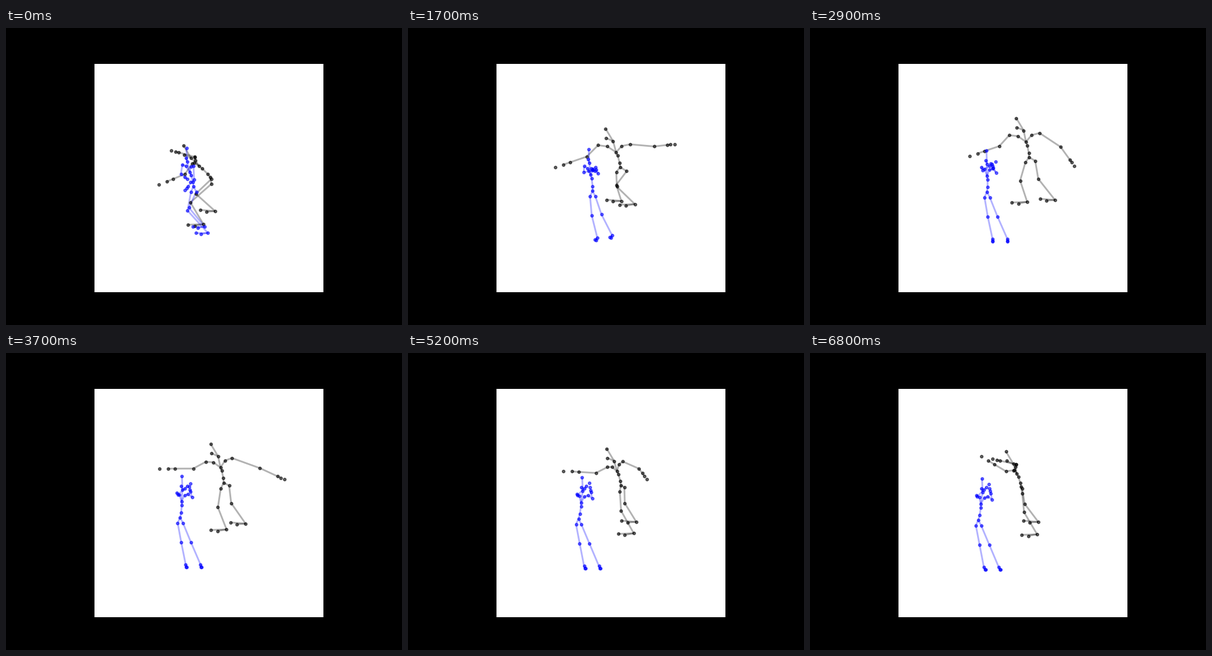
Recreate the animation shown at these times as a matplotlib script. Size 640 px wide and 480 px high, loop 6.9 s.

```python
import numpy as np
import matplotlib.pyplot as plt
from matplotlib.animation import FuncAnimation
from matplotlib.collections import LineCollection

FRAMES, INTERVAL = 69, 100
frames = np.arange(FRAMES)


def vec(x, y):
    """One 2D vector per frame from scalars or per-frame arrays."""
    return np.column_stack([np.broadcast_to(x, FRAMES), np.broadcast_to(y, FRAMES)])


def track(keys):
    """Smooth path through a few keys without overshoot; holds after the last."""
    t, p = np.array(list(keys)), np.array(list(keys.values()), float)
    h = np.diff(t)[:, None]
    d = np.diff(p, axis=0) / h
    m = np.zeros_like(p)
    m[0] = d[0]
    a, b = d[:-1], d[1:]
    same = a * b > 0
    m[1:-1][same] = (2 * a * b)[same] / (a + b)[same]
    f = np.minimum(frames, t[-1])
    i = np.clip(np.searchsorted(t, f, side="right") - 1, 0, len(t) - 2)
    w = h[i]
    u = (f - t[i])[:, None] / w
    return (p[i] * (1 + 2 * u) * (1 - u) ** 2 + m[i] * w * u * (1 - u) ** 2
            + p[i + 1] * u * u * (3 - 2 * u) + m[i + 1] * w * u * u * (u - 1))


def decay(tau):
    return np.exp(-frames / tau)


class Dancer:
    """Stick figure whose inner joints follow from pelvis, lean, wrists and ankles."""

    def __init__(self, ax, color, pelvis, lean, nose, crown):
        self.paths, self.bones = [], []
        self.lines = LineCollection([], colors=color, linewidths=2, alpha=0.3,
                                    capstyle="butt", zorder=2)
        ax.add_collection(self.lines)
        self.dots = ax.scatter([], [], s=10, c=color, alpha=0.6, zorder=3)
        self.lean = lean
        self.neck = pelvis + lean
        self.pelvis = self.joint(pelvis)
        waist = self.joint(pelvis + 0.3 * lean + (1, 0), self.pelvis)
        chest = self.joint(pelvis + 0.78 * lean + (1, 0), waist)
        self.neck_id = self.joint(self.neck, chest)
        top = self.neck + 0.74 * lean
        head = self.joint(top, self.neck_id)
        self.joint(top + nose, head)
        self.joint(top + crown, head)

    def joint(self, path, parent=None):
        self.paths.append(path)
        if parent is not None:
            self.bones.append((parent, len(self.paths) - 1))
        return len(self.paths) - 1

    def arm(self, span, wrist, sag, grip):
        middle = 0.5 * self.lean
        shoulder = self.neck + middle + span
        elbow = shoulder + 0.45 * (wrist - shoulder) + sag
        reach = wrist - elbow
        reach = reach / (np.linalg.norm(reach, axis=1, keepdims=True) + 1e-6)
        last = self.neck_id
        for path in (self.neck + 0.8 * middle + 0.45 * span, shoulder, elbow,
                     wrist, wrist + 0.45 * grip * reach):
            last = self.joint(path, last)
        self.joint(wrist + grip * reach)  # fingertip is not linked

    def leg(self, hip, ankle, push, toe):
        hip = self.paths[self.pelvis] + hip
        knee = hip + 0.46 * (ankle - hip) - vec(push, 0)
        last = self.pelvis
        for path in (hip, knee, ankle):
            last = self.joint(path, last)
        self.joint(ankle + 0.58 * toe + (0, 2), last)
        self.joint(ankle + toe, last)

    def pose(self, frame):
        p = np.array([path[frame] for path in self.paths])
        self.lines.set_segments([p[[a, b]] for a, b in self.bones])
        self.dots.set_offsets(p)


fig = plt.figure(figsize=(6.4, 4.8), dpi=100, facecolor="black")
ax = fig.add_axes([143.2 / 640, 0.11, 369.6 / 640, 0.77])
ax.set(xlim=(143.2, 512.8), ylim=(427.2, 57.6), xticks=[], yticks=[])
ax.spines[:].set_visible(False)

# Lead: turns from profile to open and back
pelvis = track({0: (330, 241), 17: (343, 225), 29: (354, 209),
                45: (348, 211), 60: (341, 216)})
lean = track({0: (-18, -18), 9: (-9, -23), 29: (-5, -25), 68: (-7, -21)})
turn = np.pi * (frames / (FRAMES - 1)) ** 0.57
open_, side = np.sin(turn), np.abs(np.cos(turn))
lead = Dancer(ax, "black", pelvis, lean, nose=(-11, -5), crown=(-12, -20))

span = vec(24 * open_ + 2, -5 * side)
wrist_l = track({0: (270, 244), 9: (281, 239), 14: (252, 222), 21: (278, 212),
                 29: (282, 199), 47: (261, 178), 60: (307, 221), 68: (298, 180)})
wrist_r = track({0: (279, 201), 3: (249, 210), 9: (380, 176), 17: (419, 189),
                 29: (420, 213), 34: (443, 198), 45: (408, 205),
                 60: (342, 178), 68: (307, 174)})
lead.arm(-span, wrist_l, sag=(2, 6), grip=25)
lead.arm(span, wrist_r, sag=(12, 3), grip=12)

hips = vec(8.5 * open_, -4 * side)
push = 8 + 20 * decay(12)
ankle_l = track({0: (319, 317), 9: (375, 290), 29: (351, 281),
                 45: (363, 290), 68: (367, 293)})
ankle_r = track({0: (338, 296), 9: (317, 281), 29: (396, 278), 50: (369, 273)})
lead.leg((2, 7) - hips, ankle_l, push, toe=vec(-25, 1))
lead.leg((2, 7) + hips, ankle_r, push, toe=vec(-24, -2))

# Partner: unfolds, then drifts in a steady pose
pelvis = track({0: (303, 256), 9: (303, 262), 29: (286, 265),
                45: (278, 267), 68: (272, 270)})
lean = track({0: (-6, -23), 17: (-3, -26), 50: (4, -26)})
partner = Dancer(ax, "blue", pelvis, lean, nose=(-2, -6), crown=(-1, -22))

span = vec(9, 1)
wrist_l = pelvis + track({0: (-14, -15), 9: (-36, -21), 17: (-6, -32), 45: (9, -49)})
wrist_r = pelvis + track({0: (-9, 0), 9: (9, -16), 17: (4, -32), 45: (20, -43)})
partner.arm(-span, wrist_l, sag=(-4, 6), grip=12)
partner.arm(span, wrist_r, sag=(5, 7), grip=8)

push = 18 * decay(9)
toe = vec(3 - 22 * decay(14), 4 - 4 * decay(14))
ankle_l = pelvis + track({0: (23, 75), 9: (2, 73), 20: (9, 76)})
ankle_r = pelvis + track({0: (18, 65), 9: (30, 68), 30: (33, 76)})
partner.leg((-4, 8.5), ankle_l, push, toe)
partner.leg((4.5, 8.5), ankle_r, push, toe)


def update(frame):
    lead.pose(frame)
    partner.pose(frame)
    return lead.lines, lead.dots, partner.lines, partner.dots


anim = FuncAnimation(fig, update, frames=FRAMES, interval=INTERVAL,
                     repeat=True, repeat_delay=0, blit=False)
plt.show()
```
